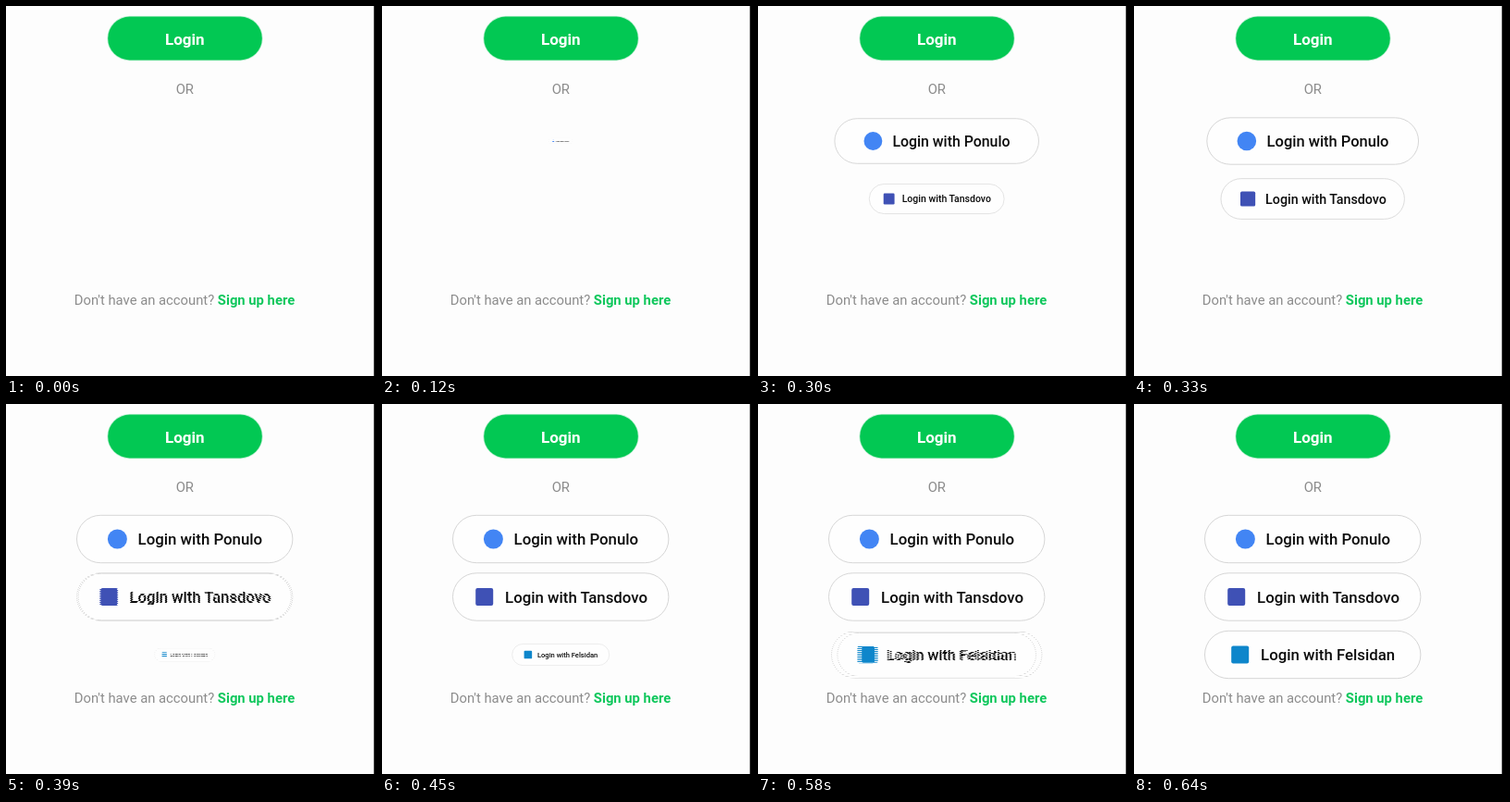
Recreate the animation shown at these times as an HTML page. Size 400 by 400 pixels, loop 1.09 s.

```html
<!DOCTYPE html>
<html lang="en">
<head>
<meta charset="utf-8">
<style>
  html, body { margin: 0; width: 100%; height: 100%; overflow: hidden; background: #fdfdfd; }
  svg { position: absolute; left: 0; top: 0; width: 400px; height: 400px; }
  text { font: 14.8px Roboto, sans-serif; fill: #8c8c8c; white-space: pre; }
  .link { font-weight: 700; fill: #0fc75c; }
  .login { font-size: 17px; font-weight: 700; fill: #fff; }
  .label { font-size: 16.8px; font-weight: 500; fill: #0c0c0c; }
  .main { fill: #02c853; stroke: #02c853; stroke-opacity: .25; stroke-width: 1.6; }
  .pill { fill: #fefefe; stroke: #d6d6d6; }
  .comb.even { mask-image: repeating-linear-gradient(#000 0 1px, transparent 1px 2px); }
  .comb.odd { mask-image: repeating-linear-gradient(transparent 0 1px, #000 1px 2px); }
</style>
</head>
<body>
<svg viewBox="0 0 400 400">
  <rect x="397.7" width="2.3" height="400" fill="#000"/>
  <rect class="main" x="110.2" y="11.6" width="166.6" height="46.8" rx="23.4"/>
  <text class="login" x="193.3" y="41.5" text-anchor="middle">Login</text>
  <text x="193.3" y="95" text-anchor="middle">OR</text>
  <text x="73.8" y="323">Don't have an account? <tspan class="link">Sign up here</tspan></text>
</svg>
<svg class="even" viewBox="0 0 400 400"></svg>
<svg class="odd" viewBox="0 0 400 400"></svg>
<script>
const LOOP = 1090, STEP = 30;

// Each button pops in: its scale per film step, beginning at step `start`
const buttons = [
  { name: 'Ponulo', y: 146, textX: -50.6, start: 4, scales: [.11, .36, .62, .89, .945, .98],
    icon: '<circle cx="-72.8" r="10.5" fill="#4285f4"/>' },
  { name: 'Tansdovo', y: 208.5, textX: -60.1, start: 6, scales: [.1, .5, .625, .85, .987],
    icon: '<rect x="-92" y="-9.5" width="19" height="19" rx="2" fill="#3f51b5"/>' },
  { name: 'Felsidan', y: 271, textX: -56.1, start: 11, scales: [.28, .45, .65, .825, .92, .975],
    icon: '<rect x="-88" y="-9.5" width="19" height="19" rx="2" fill="#0e86cb"/>' }
];

const markup = buttons.map(b => `<g>
  <rect class="pill" x="-116.7" y="-25.7" width="233.4" height="51.4" rx="25.7"/>
  ${b.icon}<text class="label" x="${b.textX}" y="6">Login with ${b.name}</text></g>`).join('');

const [even, odd] = ['.even', '.odd'].map(sel => {
  const svg = document.querySelector(sel);
  svg.innerHTML = markup;
  return { svg, groups: [...svg.querySelectorAll('g')] };
});

function pose(field, film, mixed) {
  field.svg.classList.toggle('comb', mixed);
  buttons.forEach((b, i) => {
    const scale = film < b.start ? 0 : b.scales[film - b.start] ?? 1;
    const g = field.groups[i];
    g.style.display = scale ? '' : 'none';
    g.setAttribute('transform', `translate(193.2 ${b.y}) scale(${scale})`);
  });
}

// Four film steps fill five video steps; the last two of five mix two film steps line by line
function draw(t) {
  let n = Math.floor((t < 480 ? t : t - 10) / STEP);
  if (n === 5) n = 4; // one step is held twice as long
  const phase = n % 5, mixed = phase > 2;
  const film = Math.floor(n / 5) * 4 + phase;
  pose(even, film, mixed);
  pose(odd, film - 1, mixed);
  odd.svg.style.display = mixed ? '' : 'none';
}

function tick(now) {
  draw(now % LOOP);
  requestAnimationFrame(tick);
}
draw(0);
requestAnimationFrame(tick);
</script>
</body>
</html>
```
